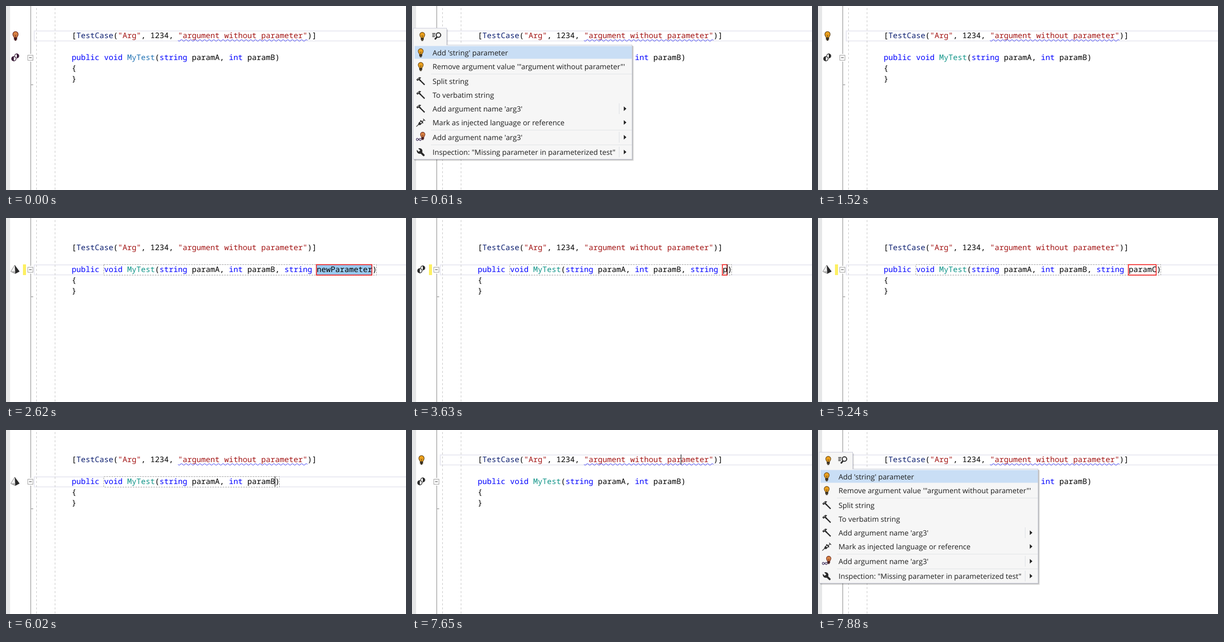
Recreate the animation shown at these times as an HTML page. Size 779 px wide and 361 px high, loop 8 s.

```html
<!DOCTYPE html>
<html lang="en">
<head>
<meta charset="utf-8">
<title>Add parameter quick fix</title>
<style>
html, body { margin: 0; width: 100%; height: 100%; overflow: hidden; background: #fff; }
svg { display: block; }
text { white-space: pre; text-rendering: geometricPrecision; }
.code { font: 15px "Noto Sans Mono", "DejaVu Sans Mono", monospace; fill: #000; font-variant-ligatures: none; }
.menu { font: 14.2px "Open Sans", "Noto Sans", sans-serif; fill: #1e1e1e; }
.key { fill: #0000ff; }
.str { fill: #a31515; }
.type { fill: #0c1f70; }
</style>
</head>
<body>
<svg id="stage" width="779" height="361" viewBox="0 0 779 361"></svg>
<script>
const LOOP = 8000, LEFT = 128, CHAR = 9, DARK = '#2a2a2a';
const stage = document.getElementById('stage');

// Each step changes part of the editor state and keeps the rest.
const steps = [
  [0, { row: 0, col: 33, caret: 0, bulb: 1, icon: 'test', param: '', sel: 0,
        field: 0, wave: 1, mark: 0, menu: 0, tint: 1 }],
  [130, { caret: 1 }],
  [610, { caret: 0, menu: 1 }],
  [1520, { menu: 0, tint: 0 }],
  [1690, { param: 'newParameter', wave: 0, mark: 1 }],
  [1810, { bulb: 0 }],
  [2090, { row: 1, col: 65, caret: 1, sel: 1, field: 1 }],
  [2300, { icon: 'hint' }],
  [2620, { caret: 0 }],
  [3170, { caret: 1 }],
  ...[...'param'].map((c, i) => [3480 + 165 * i,
    { param: 'param'.slice(0, i + 1), col: 54 + i, sel: 0, icon: 'test' }]),
  [4470, { param: 'paramC', col: 59 }],
  [4780, { icon: 'hint' }],
  [5240, { caret: 0 }],
  [5790, { caret: 1 }],
  [5900, { param: '', col: 44, mark: 0 }],
  [6020, { wave: 1 }],
  [6170, { icon: 'test' }],
  [6260, { icon: 'hint' }],
  [6350, { caret: 0 }],
  [6880, { caret: 1 }],
  [7150, { row: 0, field: 0, icon: 'test' }],
  [7650, { bulb: 1 }],
  [7880, { caret: 0, menu: 1 }]
];
const states = [];
steps.forEach(([, change], i) => states.push({ ...states[i - 1], ...change }));

const colX = n => LEFT + n * CHAR;
const rect = (x, y, w, h, fill, extra = '') =>
  `<rect x="${x}" y="${y}" width="${w}" height="${h}" fill="${fill}" ${extra}/>`;
const path = (d, stroke, extra = '') => `<path d="${d}" fill="none" stroke="${stroke}" ${extra}/>`;
const shape = (d, fill) => `<path d="${d}" fill="${fill}"/>`;
const at = (x, y, body, scale = 1) => `<g transform="translate(${x} ${y}) scale(${scale})">${body}</g>`;
const span = (cls, s) => `<tspan class="${cls}">${s}</tspan>`;
const code = (y, s) => `<text class="code" x="${LEFT}" y="${y}">${s}</text>`;

function bulb(tint) {
  const ink = tint ? '#431a1c' : '#3a3020';
  return `<path d="M-2.6 3C-2.6 1-5.2-.3-5.2-3.6A5.2 5.2 0 0 1 5.2-3.6C5.2-.3 2.6 1 2.6 3Z"
    fill="${tint ? '#d98243' : '#eca01c'}" stroke="${tint ? '#6b2a20' : '#6a4a18'}" stroke-width="1.2"/>` +
    path('M-1.7-2.5L0-.5L1.7-2.5M0-.5V3', ink, 'stroke-width=".8"') +
    rect(-3, 3, 6, 4, ink) + rect(-1.8, 7, 3.6, 2, ink);
}

function testIcon(tint) {
  const ink = tint ? '#3a1c38' : DARK;
  const disc = (x, y, r, sweep) => at(x, y,
    `<circle r="${r + 1.2}" fill="#fff"/><circle r="${r}" fill="#fff" stroke="${ink}" stroke-width="1.4"/>` +
    shape(`M0 ${-r}A${r} ${r} 0 0 ${sweep} 0 ${r}Z`, ink));
  return disc(3, -3, 4, 1) + disc(-2.7, 2.5, 4.3, 0);
}

const hintIcon = path('M-1-8.5L-8.5 4L0 8', '#6a6a6a', 'stroke-linejoin="round"') +
  shape('M-1-8L-8 4L-1 3Z', '#f2f2f2') + shape('M-8 4L0 7.5L-1 3Z', '#b4b4b4') +
  shape('M-1-9L8.5 4L0 8.5Z', DARK);
const hammer = shape('M-9-4L-3-9L1-8L-2-5L1-2L-1 0L-4-3L-7-1Z', DARK) +
  path('M-1-2L8 7', DARK, 'stroke-width="2.4"') + path('M-6.5-4L-3-7', '#f6f6f6');
const syringe = path('M-9 8L-4 3M5-8L9-4M7-6L3-2M-1-5L5 1', DARK, 'stroke-width="1.4"') +
  path('M-4 1L1-4L4-1L-1 4L-4 4Z', DARK, 'stroke-width="1.4"') + shape('M-4 1L-2-1L1 2L-1 4L-4 4Z', DARK);
const wrench = path('M-1-1L6 6', DARK, 'stroke-width="4" stroke-linecap="round"') +
  shape('M-8-5L-4-1L-1-4L-5-8C1-10 5-5 3 0L0 3C-5 4-9 0-8-5Z', DARK);
const search = `<circle cx="3" cy="-2" r="4.4" fill="none" stroke="${DARK}" stroke-width="2"/>` +
  path('M0 2L-4 6.5', DARK, 'stroke-width="3"') +
  path('M-9-5H-3M-9-2H-4M-9 1H-4', DARK, 'stroke-width="1.5"');
const bulbLink = at(4, -3, bulb(1), .9) +
  path('M-4 4C-7 0-9 2-9 4S-7 8-4 4S1 2 1 4S-1 8-4 4', '#51436a', 'stroke-width="1.5"');

// Centre line, label, icon, arrow, divider before the arrow
const items = [
  [92, "Add 'string' parameter", bulb(0)],
  [119, "Remove argument value '\"argument without parameter\"'", bulb(0)],
  [148, 'Split string', hammer],
  [175, 'To verbatim string', hammer],
  [202, "Add argument name 'arg3'", hammer, 1, 1],
  [229, 'Mark as injected language or reference', syringe, 1],
  [258, "Add argument name 'arg3'", bulbLink, 1, 1],
  [287, 'Inspection: "Missing parameter in parameterized test"', wrench, 1, 1]
];

function menu() {
  const edge = 'stroke="#cccedb"';
  let out = rect(5, 79, 427, 225, '#000', 'opacity=".08"') +
    rect(4, 78, 426.5, 224.5, '#000', 'opacity=".22"') +
    rect(67, 46, 2.5, 30, '#000', 'opacity=".2"') +
    rect(2.5, 76.5, 426, 224, '#f6f6f6', edge) +
    rect(2.5, 43.5, 65, 33, '#f6f6f6', edge) + rect(3, 75, 64, 3, '#f6f6f6') +
    rect(5, 78.5, 423, 25, '#c9def5');
  for (const y of [133, 243, 272]) out += rect(37, y, 391, 1, '#e0e3e6');
  for (const [y, label, icon, arrow, divider] of items) {
    out += at(17, y, icon, .95) + `<text class="menu" x="40" y="${y + 5}">${label}</text>`;
    if (arrow) out += shape(`M412.5 ${y - 5}L417.5 ${y - .5}L412.5 ${y + 4}Z`, '#1e1e1e');
    if (divider) out += rect(403, y - 11, 1, 21, '#dcdfe3');
  }
  return out + at(20, 60, bulb(0), .95) + at(48.5, 59, search);
}

function gutter() {
  const dash = 'stroke-dasharray="4 4"';
  return rect(0, 0, 8, 361, '#e6e7e8') +
    path('M48.2 0V94M48.2 109V361M48 154.5H53', '#a5a5a5', 'stroke-width="1.4"') +
    path('M59.5 4V361M95.5 4V361', '#c6c6c6', dash) +
    rect(42.5, 96.5, 10, 10, '#fff', 'stroke="#a0a0a0"') + path('M45 101.5H50', '#444');
}

function wave() {
  let d = 'M335 67.5';
  for (let x = 335; x < 587; x += CHAR) d += 'q2.25 3 4.5 0t4.5 0';
  return path(d, '#5050f0', 'stroke-width="1.2"');
}

function render(s) {
  const top = s.row ? 91 : 48;
  const extra = s.param ? `, ${span('key', 'string')} ${s.param}` : '';
  const end = s.param ? 53 + s.param.length : 44;
  let out = rect(55, top + 1, 740, 19.5, 'none', 'stroke="#eaeaf2" stroke-width="2"') + gutter();

  if (s.mark) out += rect(33, 91, 6, 21, '#fdf063');
  if (s.field) {
    out += rect(190.5, 91.5, colX(end + 1) - 191, 20.5, '#fff',
      'stroke="#9b9b9b" stroke-dasharray="3 2"');
  }
  if (s.field && s.param) {
    out += rect(604.5, 91.5, colX(end) - 605, 20.5, s.sel ? '#99c9ef' : '#fff',
      'stroke="#f01414" stroke-width="1.6"');
  }
  out += code(63, `[${span('type', 'TestCase')}(${span('str', '"Arg"')}, 1234, ` +
    `${span('str', '"argument without parameter"')})]`);
  out += code(106, `${span('key', 'public void')} ` +
    `<tspan fill="${s.tint ? '#2072b4' : '#109488'}">MyTest</tspan>(` +
    `${span('key', 'string')} paramA, ${span('key', 'int')} paramB${extra})`);
  out += code(127, '{') + code(148, '}');

  if (s.wave) out += wave();
  if (s.caret) out += rect(colX(s.col) - .6, top, 1.1, 20, '#000');
  if (s.bulb) out += at(18.5, 59, bulb(s.tint));
  out += at(18, 101, s.icon === 'hint' ? hintIcon : testIcon(s.tint));
  if (s.menu) out += menu();
  stage.innerHTML = out;
}

let shown = -1;
function tick() {
  const t = performance.now() % LOOP;
  let i = steps.length - 1;
  while (steps[i][0] > t) i--;
  if (i !== shown) render(states[shown = i]);
  requestAnimationFrame(tick);
}
tick();
</script>
</body>
</html>
```
